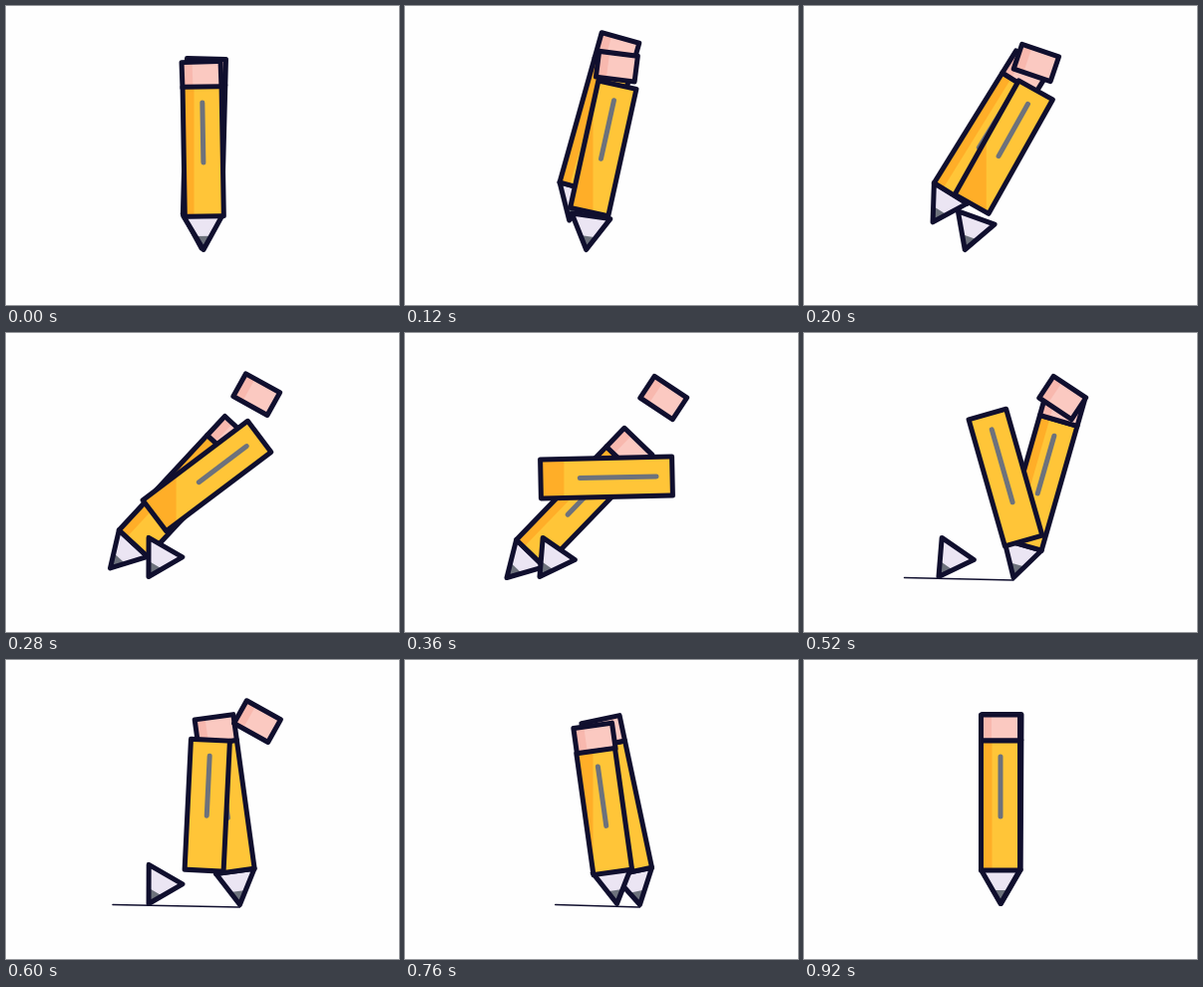
Recreate the animation shown at these times as an HTML page with a canvas. Size 394 by 300 pixels, loop 960 ms.

```html
<!DOCTYPE html>
<html lang="en">
<head>
<meta charset="utf-8">
<title>Pencil</title>
<style>
  html, body { margin: 0; width: 100%; height: 100%; overflow: hidden; background: #fefefe; }
  canvas { display: block; width: 394px; height: 300px; }
</style>
</head>
<body>
<canvas id="stage"></canvas>
<script>
const W = 394, H = 300, LOOP = 960, STEP = 40;
const PAPER = '#fefefe', INK = '#100f2e', YELLOW = '#ffc538', ORANGE = '#ffae28',
      PINK = '#fbc9c1', ROSE = '#f8b8ae', WOOD = '#ebe5f3', LEAD = '#6d727c';
const HALF = 19.5, BODY = 130, RUBBER = 26, TIP = 34, GROOVE = 60, INSET = 16;

const canvas = document.getElementById('stage');
const ctx = canvas.getContext('2d');
const dpr = window.devicePixelRatio || 1;
canvas.width = W * dpr;
canvas.height = H * dpr;

const ramp = (t, from, to) => Math.min(1, Math.max(0, (t - from) / (to - from)));
const ease = (t, from, to) => {
  const u = ramp(t, from, to);
  return u * u * (3 - 2 * u);
};
const mix = (a, b, p) => a + (b - a) * p;
const arc = p => Math.sin(Math.PI * p);

// Moves a value through a series of [progress, goal] stages
const chain = (value, ...stages) => stages.reduce((v, [p, goal]) => mix(v, goal, p), value);

function at(x, y, deg, draw) {
  ctx.save();
  ctx.translate(x, y);
  ctx.rotate(deg * Math.PI / 180);
  draw();
  ctx.restore();
}

function outline(color = INK, width = 5) {
  ctx.strokeStyle = color;
  ctx.lineWidth = width;
  ctx.stroke();
}

function line(x1, y1, x2, y2, color, width) {
  ctx.beginPath();
  ctx.moveTo(x1, y1);
  ctx.lineTo(x2, y2);
  outline(color, width);
}

function box(top, height, fill, side, strip = 0) {
  ctx.fillStyle = fill;
  ctx.fillRect(-HALF, top, 2 * HALF, height);
  ctx.fillStyle = side;
  ctx.fillRect(-HALF, top, strip, height);
  ctx.beginPath();
  ctx.rect(-HALF, top, 2 * HALF, height);
}

function drawRubber(top) {
  box(top, RUBBER, PINK, ROSE, 10.5);
  outline();
}

function triangle(scale) {
  ctx.beginPath();
  ctx.moveTo(0, 0);
  ctx.lineTo(-HALF * scale, -TIP * scale);
  ctx.lineTo(HALF * scale, -TIP * scale);
  ctx.closePath();
}

function drawTip() {
  triangle(1);
  ctx.fillStyle = WOOD;
  ctx.fill();
  triangle(0.4);
  ctx.fillStyle = LEAD;
  ctx.fill();
  triangle(1);
  outline();
}

function drawPencil() {
  const top = -TIP - BODY;
  drawTip();
  box(top, BODY, YELLOW, ORANGE, 10.5);
  outline();
  line(0, top + INSET, 0, top + INSET + GROOVE, LEAD, 5);
  drawRubber(top - RUBBER);
}

// The shaded side keeps to the left of the stage while the body turns
function drawBody(x, y, deg, length, shadeX, grow, shrink) {
  at(x, y, deg, () => {
    box(-length / 2, length, YELLOW);
    ctx.save();
    ctx.clip();
    ctx.rotate(-deg * Math.PI / 180);
    ctx.fillStyle = ORANGE;
    ctx.fillRect(-W, -H, W + shadeX - x, 2 * H);
    ctx.restore();
    ctx.beginPath();
    ctx.rect(-HALF, -length / 2, 2 * HALF, length);
    outline();
    const end = length / 2 - INSET, slack = 2 * end - GROOVE;
    line(0, -end + slack * shrink, 0, end - slack * (1 - grow), LEAD, 5);
  });
}

function render(t) {
  // The whole pencil leaps out, sweeps along the ground and comes home
  const leap = ease(t, 0, 310), sweep = Math.sin(ramp(t, 370, 620) * Math.PI / 2);
  const sway = ease(t, 400, 640), home = ease(t, 760, 920);
  const backX = chain(196, [leap, 102], [sweep, 235.5], [home, 197.5]);
  const backY = 245.5 - 31 * arc(ramp(t, 0, 310)) - 2.5 * (1 - ramp(t, 0, 310)) - home;
  const backTilt = chain(1.5, [leap, 44], [sway, -12], [home, 0.3]);

  // The other one splits, spins its body and folds together again
  const split = ease(t, 0, 360), spin = ease(t, 220, 620), fold = ease(t, 560, 760);
  const via = (start, apart, leaning, rest) =>
    chain(start, [split, apart], [fold, leaning], [home, rest]);

  ctx.setTransform(dpr, 0, 0, dpr, 0, 0);
  ctx.fillStyle = PAPER;
  ctx.fillRect(0, 0, W, H);
  ctx.lineCap = ctx.lineJoin = 'round';

  const fade = ramp(t, 510, 920) ** 2;
  if (sweep > 0 && fade < 1) line(mix(100.5, backX, fade), 245.5, backX, 248, INK, 1.4);

  at(backX, backY, backTilt, drawPencil);
  at(via(196, 259.2, 190, 197),
     via(69, 65, 78.7, 68) - 10 * arc(split) - 15 * arc(fold),
     via(-2, 33.5, -8, 0),
     () => drawRubber(-RUBBER / 2));
  at(via(198, 135, 212.5, 197), 244.5, via(-1, 34.5, -8.5, 0), drawTip);
  drawBody(
    via(197.7, 202, 199.7, 197),
    via(146, 145, 152, 146) - 4 * arc(split),
    chain(-1, [split, 51], [spin, 185], [fold, 172], [home, 180]),
    via(BODY, 132, 123, BODY),
    chain(188.5, [ease(t, 120, 420), 156], [fold, 188.5]),
    ease(t, 280, 460),
    ease(t, 440, 580)
  );
}

const start = performance.now();
function tick() {
  const t = (performance.now() - start) % LOOP;
  render(Math.floor(t / STEP) * STEP);
  requestAnimationFrame(tick);
}
tick();
</script>
</body>
</html>
```
